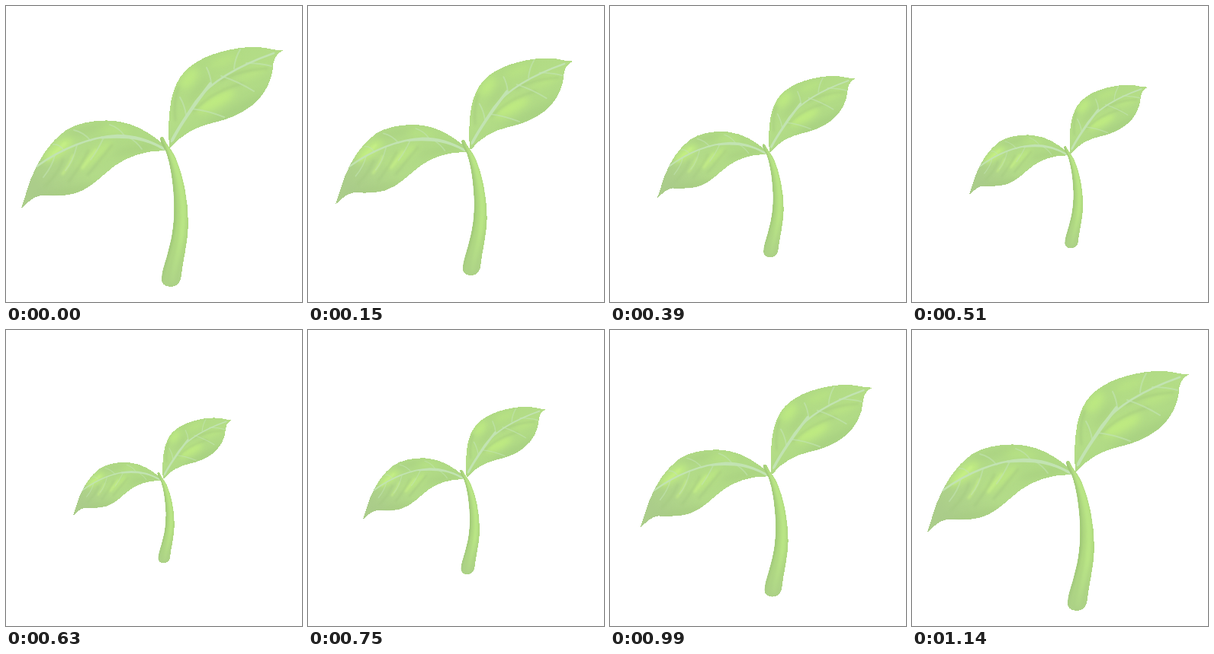
Write an HTML page that moves like this. It is 388 by 389 pixels and loops after 1.21 s.

```html
<!DOCTYPE html>
<html lang="en">
<head>
<meta charset="utf-8">
<title>Sprout</title>
<style>
  html, body { margin: 0; width: 100%; height: 100%; overflow: hidden; background: #fff; }
  svg { display: block; width: 100%; height: 100%; }
  filter { color-interpolation-filters: sRGB; }
  use, clipPath { shape-rendering: crispEdges; }
  .vein { fill: none; stroke: #c2e3b2; stroke-linecap: round; }
  .lit { fill: #c2ef80; }
  .dim { fill: #a3c97e; }
  .ray { fill: none; stroke-linecap: round; }
</style>
</head>
<body>
<svg viewBox="0 0 388 389">
  <defs>
    <path id="right" d="M214 186C212 153 213 117 228 94C244 70 276 60 304 55.500C321 53 337 53.500 350 57C355 58.500 359 57 363 58.500C357 62 352 66 350.500 75C349 100 338 118 322 131C307 143 289 149.500 271 153.500C249 158.500 230 169 216 186Z"/>
    <path id="left" d="M20 265C25 251 28 240 33 226C43 201 57 179 78 163.500C95 152.500 121 149 142 151C170 154 190 168 208 183L208 190C181 190 160 198 144 209C126 222 113 239 91 246C75 250.500 59 249 46 249C36 250 29 258 21 265Z"/>
    <path id="stem" d="M202 174Q204 170 207 174C210 182 217 188 222 199C232 222 238.500 252 239 286C238.500 311 232 333 229 359Q226 369 215 369Q204 368 204 359C204.500 346 210 335 213.500 319C218.500 302 221 281 220.500 260C219.500 234 216 209 210 192C206 185 203 181 202 174Z"/>
    <clipPath id="rightClip"><use href="#right"/></clipPath>
    <clipPath id="leftClip"><use href="#left"/></clipPath>
    <clipPath id="stemClip"><use href="#stem"/></clipPath>
    <linearGradient id="rightFill" gradientUnits="userSpaceOnUse" x1="250" y1="70" x2="300" y2="150">
      <stop offset="0" stop-color="#b0da84"/><stop offset=".55" stop-color="#b4dd87"/><stop offset="1" stop-color="#add784"/>
    </linearGradient>
    <linearGradient id="leftFill" gradientUnits="userSpaceOnUse" x1="150" y1="155" x2="50" y2="248">
      <stop offset="0" stop-color="#b0da85"/><stop offset=".55" stop-color="#b3db89"/><stop offset="1" stop-color="#abcd8a"/>
    </linearGradient>
    <linearGradient id="foot" x1="0" y1="0" x2="0" y2="1">
      <stop offset=".65" stop-color="#abcf88" stop-opacity="0"/><stop offset="1" stop-color="#abcf88" stop-opacity=".8"/>
    </linearGradient>
    <filter id="soft" x="-50%" y="-50%" width="200%" height="200%"><feGaussianBlur stdDeviation="5"/></filter>
    <filter id="fine" x="-20%" y="-20%" width="140%" height="140%"><feGaussianBlur stdDeviation="1.800"/></filter>
    <filter id="veined" x="-20%" y="-20%" width="140%" height="140%"><feGaussianBlur stdDeviation=".7"/></filter>
  </defs>

  <g id="sprout">
    <use href="#right" fill="url(#rightFill)"/>
    <g clip-path="url(#rightClip)">
      <g filter="url(#soft)">
        <ellipse class="lit" cx="275" cy="125" rx="28" ry="8" transform="rotate(-28 275 125)" opacity=".8"/>
        <ellipse class="lit" cx="240" cy="95" rx="16" ry="8" transform="rotate(-52 240 95)" opacity=".7"/>
        <ellipse class="lit" cx="285" cy="72" rx="20" ry="5" transform="rotate(-22 285 72)" opacity=".4"/>
        <ellipse class="lit" cx="324" cy="88" rx="22" ry="5" transform="rotate(-22 324 88)" opacity=".4"/>
        <ellipse class="dim" cx="303" cy="137" rx="48" ry="6" transform="rotate(-28 303 137)" opacity=".45"/>
        <ellipse class="dim" cx="252" cy="111" rx="23" ry="4" transform="rotate(-52 252 111)" opacity=".5"/>
      </g>
      <g class="ray" filter="url(#fine)" stroke="#a4ca7e" stroke-width="3" opacity=".6">
        <path d="M246 138Q270 112 309 102M281 98Q307 84 342 82M222 150Q219 127 226 107"/>
      </g>
      <g class="vein" filter="url(#veined)">
        <path d="M217 178C227 158 237 143 249 125C266 103 295 82 351 62" stroke-width="2.600"/>
        <path d="M218 176Q232 149 268 102" stroke-width="4"/>
        <path d="M236 143Q234 130 228 120M269 102Q268 91 263 81M299 82Q300 69 307 57M282 92Q304 99 325 112M315 75Q333 75 348 79M243 135Q263 137 286 146" stroke-width="2" opacity=".65"/>
      </g>
    </g>

    <use href="#left" fill="url(#leftFill)"/>
    <g clip-path="url(#leftClip)">
      <g filter="url(#soft)">
        <ellipse class="lit" cx="68" cy="189" rx="24" ry="7" transform="rotate(-38 68 189)"/>
        <ellipse class="lit" cx="117" cy="196" rx="28" ry="7" transform="rotate(-38 117 196)" opacity=".6"/>
        <ellipse class="lit" cx="141" cy="163" rx="23" ry="5" transform="rotate(5 141 163)" opacity=".35"/>
        <ellipse class="dim" cx="84" cy="244" rx="43" ry="6" transform="rotate(-13 84 244)" opacity=".5"/>
        <ellipse class="dim" cx="172" cy="188" rx="34" ry="4" transform="rotate(-12 172 188)" opacity=".5"/>
        <ellipse class="dim" cx="105" cy="163" rx="30" ry="4" transform="rotate(-14 105 163)" opacity=".5"/>
      </g>
      <g class="ray" filter="url(#fine)">
        <path d="M75 202Q68 221 52 236M108 190Q96 213 82 231M139 183Q122 204 107 222" stroke="#a3c981" stroke-width="3" opacity=".6"/>
        <path d="M88 196Q82 211 74 221M55 202L78 180M118 189L100 213" stroke="#c8f189" stroke-width="3" opacity=".8"/>
      </g>
      <g class="vein" filter="url(#veined)">
        <path d="M207 188C188 176 167 170 146 170C111 172 73 187 40 211" stroke-width="2.600"/>
        <path d="M206 187C184 175 164 170 125 173" stroke-width="3.200"/>
        <path d="M155 170Q148 160 136 156M111 177Q102 166 89 163M76 190Q70 181 62 182M159 171Q172 179 178 188M128 173Q120 190 111 202M93 183Q88 204 78 216M64 196Q61 210 49 225" stroke-width="1.800" opacity=".6"/>
      </g>
    </g>

    <use href="#stem" fill="#b0da80"/>
    <g clip-path="url(#stemClip)">
      <g class="ray" filter="url(#fine)">
        <path d="M209 178C229 212 235 258 231 294C229 321 221 338 218 361" stroke="#b9e585" stroke-width="7"/>
        <path d="M207 173C217 188 225 195 232 220C248 277 240 312 231 364" stroke="#a9d37b" stroke-width="3"/>
        <path d="M202 176C217 203 222 251 220 283C217 319 206 339 203 363" stroke="#a0c878" stroke-width="6"/>
      </g>
      <use href="#stem" fill="url(#foot)"/>
    </g>
  </g>
</svg>
<script>
  const sprout = document.getElementById('sprout');
  const LOOP = 1210, STEP = 30, LOW_AT = 630, TOP_AT = 1140, LOW = 0.606;
  const CX = 192.8, CY = 210;

  function scaleAt(t) {
    const away = t < LOW_AT ? t / LOW_AT : (TOP_AT - t) / (TOP_AT - LOW_AT);
    return 1 - (1 - LOW) * away;
  }

  function draw(ms) {
    const t = Math.min(Math.floor((ms % LOOP) / STEP) * STEP, TOP_AT);
    const s = scaleAt(t);
    sprout.setAttribute('transform', `translate(${CX * (1 - s)} ${CY * (1 - s)}) scale(${s})`);
  }

  const start = performance.now();
  function tick(now) {
    draw(Math.max(0, now - start));
    requestAnimationFrame(tick);
  }
  draw(0);
  requestAnimationFrame(tick);
</script>
</body>
</html>
```
